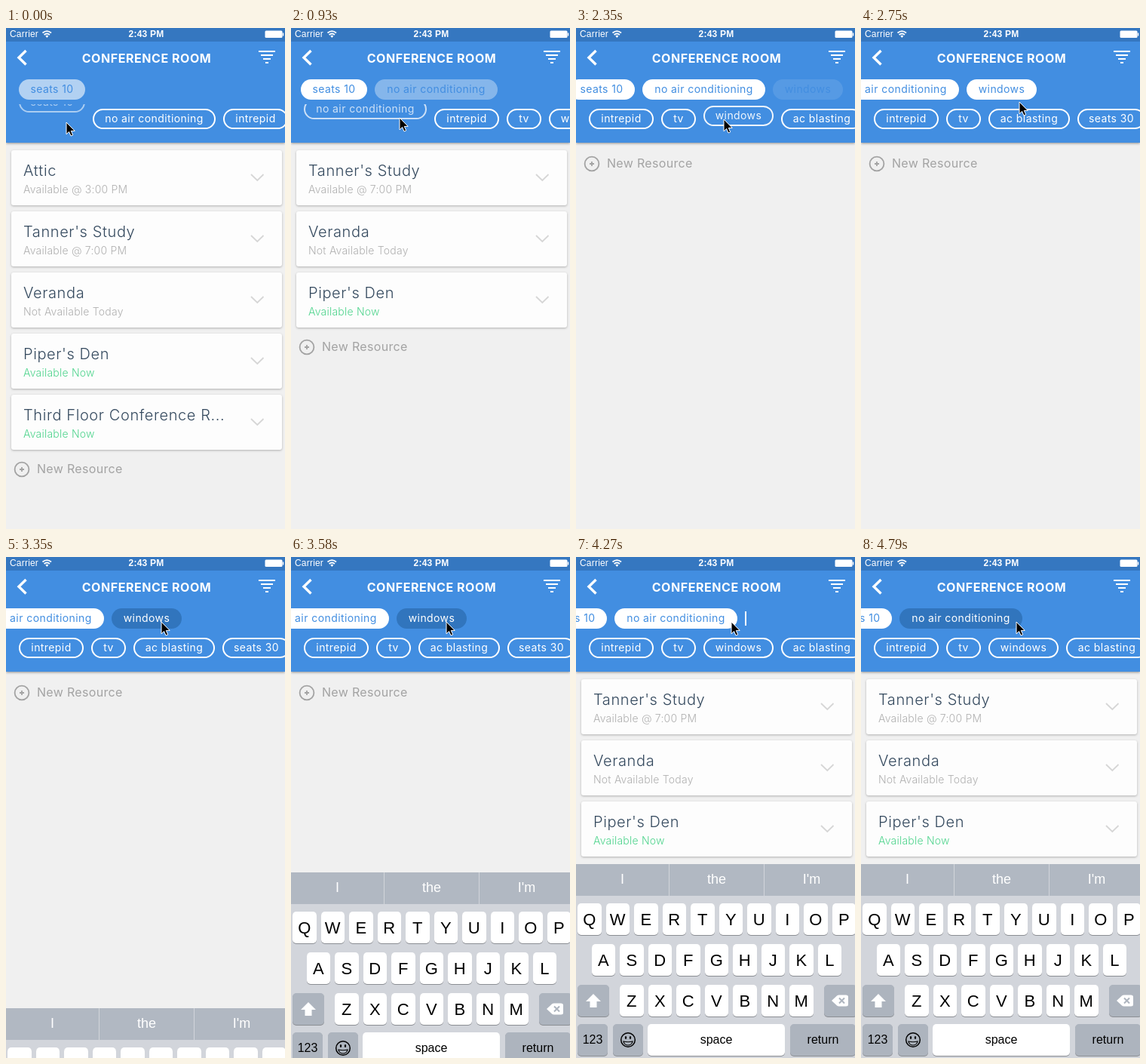
An HTML page that plays this animation: 370x664 px, repeating every 4.95 s.

```html
<!DOCTYPE html>
<html lang="en">
<head>
<meta charset="utf-8">
<title>Room filter</title>
<style>
  html, body { margin: 0; width: 100%; height: 100%; overflow: hidden; background: #f0f0f0; }
  #stage { position: relative; width: 370px; height: 664px; overflow: hidden; background: #f0f0f0;
    font: 300 14px/1 Inter, "Open Sans", sans-serif; letter-spacing: .025em; }
  #stage * { box-sizing: border-box; }
  #stage div, #stage svg { position: absolute; white-space: nowrap; }
  #stage svg { overflow: visible; fill: none; }

  #header { width: 370px; height: 152px; background: #428ee1; color: #fff; box-shadow: 0 1px 3px rgba(0,0,0,.4); }
  #status { width: 370px; height: 18px; background: #3577c0;
    font: 12px/17px "Liberation Sans", Arial, sans-serif; letter-spacing: .2px; }
  #title { left: 0; width: 373px; top: 32px; text-align: center; font-weight: 700; font-size: 16px; letter-spacing: .55px; }
  .row { left: 0; width: 370px; overflow: hidden; }
  #chosen { top: 68px; height: 27px; }
  #tags { top: 101px; height: 51px; }
  .chip { left: 0; top: 0; height: 27px; border-radius: 14px; text-align: center; line-height: 25px;
    font-weight: 400; letter-spacing: .03em; }
  #chosen .chip { background: #fff; color: #428ee1; }
  #chosen .chip.dark { background: #3175bd; color: #fff; }
  #tags .chip { top: 6px; border: 2px solid #fff; line-height: 21px; }
  #caret { left: 224px; top: 4px; width: 2px; height: 19px; background: #fff; }

  #stage #list { left: 7px; top: 162px; width: 359px; }
  #stage .card { position: relative; height: 73px; margin-bottom: 8px; background: #fdfdfd; border-radius: 3px;
    box-shadow: 0 1px 3px rgba(0,0,0,.27); }
  .name { left: 16px; top: 17px; font-size: 20px; line-height: 20px; color: #34495e; letter-spacing: .03em; }
  .info { left: 16px; top: 45px; color: #b0b0b0; letter-spacing: .015em; }
  .info.free { color: #4fd48d; }
  #stage #add { position: relative; height: 36px; color: #a3a3a3; font-size: 16px; font-weight: 400; line-height: 35px; padding-left: 34px; letter-spacing: .02em; }

  #keyboard { left: 0; top: 0; width: 375px; height: 257px; background: #d2d5db; color: #000;
    font: 22px "Liberation Sans", Arial, sans-serif; letter-spacing: 0; }
  .hint { top: 0; height: 42px; background: #b1b8c2; color: #fff; font-size: 18px; line-height: 40px; text-align: center; }
  .key { height: 42px; line-height: 43px; border-radius: 5px; background: #fff; text-align: center; box-shadow: 0 1px 0 #8b8e93; }
  .key.grey { background: #adb4be; }
  .key.word { font-size: 16px; line-height: 41px; }
</style>
</head>
<body>
<div id="stage">
  <div id="list"></div>
  <div id="header">
    <div id="status">
      <div style="left:5px">Carrier</div>
      <div style="left:0;width:372px;text-align:center;font-weight:700">2:43 PM</div>
      <svg width="370" height="18" stroke="#fff" stroke-width="1.8">
        <path d="M48.5 6.5Q54.3 1.7 60 6.5M50.6 9Q54.3 6 58 9"/>
        <path d="M52.3 10.6Q54.3 9 56.3 10.6L54.3 13Z" fill="#fff" stroke="none"/>
        <rect x="343.5" y="3.5" width="23" height="9.5" rx="1.5" fill="#fff" stroke="none"/>
        <path d="M367.5 6.5V10.5" stroke-width="1.5"/>
      </svg>
    </div>
    <svg width="370" height="60" stroke="#fff">
      <path d="M26.5 30L17 39.3L26.5 48.5" stroke-width="3.4"/>
      <path d="M335 31H357M338 36H354M341 41H351M344 46H348" stroke-width="2"/>
    </svg>
    <div id="title">CONFERENCE ROOM</div>
    <div id="chosen" class="row"><div id="caret"></div></div>
    <div id="tags" class="row"></div>
  </div>
  <div id="keyboard"></div>
  <svg id="cursor" width="12" height="19">
    <path d="M0 0V15.8L3.6 12.4L6 18L8.7 16.9L6.3 11.4H11.2Z" fill="#000" stroke="#fff" stroke-width="1"/>
  </svg>
</div>
<script>
const LOOP = 4950;
const $ = id => document.getElementById(id);

function add(parent, className, text = '', style = {}) {
  const el = document.createElement('div');
  el.className = className;
  el.textContent = text;
  Object.assign(el.style, style);
  parent.append(el);
  return el;
}

// Rooms
const rooms = [
  ['Attic', 'Available @ 3:00 PM'],
  ["Tanner's Study", 'Available @ 7:00 PM'],
  ['Veranda', 'Not Available Today'],
  ["Piper's Den", 'Available Now'],
  ['Third Floor Conference R...', 'Available Now']
].map(([name, info]) => {
  const card = add($('list'), 'card');
  add(card, 'name', name);
  add(card, info.endsWith('Now') ? 'info free' : 'info', info);
  card.insertAdjacentHTML('beforeend',
    '<svg width="359" height="73"><path d="M318 32L326.3 40L334.5 32" stroke="#d6d6d6" stroke-width="1.8"/></svg>');
  return card;
});
const addRow = add($('list'), '', 'New Resource');
addRow.id = 'add';
addRow.insertAdjacentHTML('beforeend',
  '<svg style="left:0;top:0" width="30" height="36" stroke="#a3a3a3" stroke-width="1.8"><circle cx="14" cy="18" r="9.4"/><path d="M11 18H17M14 15V21"/></svg>');

// Filter chips
const makeChip = (row, text, width) => add($(row), 'chip', text, { width: width + 'px' });
const tags = [
  ['seats 10', 88], ['no air conditioning', 163], ['intrepid', 86], ['tv', 46],
  ['windows', 93], ['ac blasting', 108], ['seats 30', 90]
].map(([text, width]) => ({ text, width, el: makeChip('tags', text, width) }));
const [seats, noAir, , , windows] = tags;
const chosen = [seats, noAir, windows].map(tag => makeChip('chosen', tag.text, tag.width));

// Keyboard
const board = $('keyboard');
const px = n => n + 'px';
const key = (text, left, top, width, kind = '') =>
  add(board, 'key ' + kind, text, { left: px(left), top: px(top), width: px(width) });
['I', 'the', "I'm"].forEach((text, i) =>
  add(board, 'hint', text, { left: px([0, 124, 250][i]), width: px([123, 125, 125][i]) }));
[['QWERTYUIOP', 2, 52], ['ASDFGHJKL', 20.5, 106], ['ZXCVBNM', 58, 160]].forEach(([letters, left, top]) =>
  [...letters].forEach((letter, i) => key(letter, left + 37.5 * i, top, 31.5)));
const icon = (el, shapes) => el.insertAdjacentHTML('beforeend',
  `<svg style="left:0;top:0" width="42" height="42">${shapes}</svg>`);
icon(key('', 2, 160, 42, 'grey'),
  '<path d="M21 12L31 22H25.5V30H16.5V22H11Z" fill="#fff"/>');
icon(key('', 329, 160, 44, 'grey'),
  '<path d="M10 21L17 14.5Q18 13.5 20 13.5H29Q32 13.5 32 16V26Q32 28.5 29 28.5H20Q18 28.5 17 27.5Z" fill="#fff"/>' +
  '<path d="M20 17.5L27 24.5M27 17.5L20 24.5" stroke="#adb4be" stroke-width="2"/>');
key('123', 2, 212, 40, 'grey word');
icon(key('', 49, 212, 40, 'grey'),
  '<circle cx="20" cy="21" r="9.3" stroke="#000" stroke-width="1.5"/>' +
  '<path d="M14 23Q20 24.5 26 23Q25 28 20 28T14 23Z" stroke="#000" stroke-width="1.2"/>' +
  '<ellipse cx="17" cy="18" rx="1.2" ry="2" fill="#000"/><ellipse cx="23" cy="18" rx="1.2" ry="2" fill="#000"/>');
key('space', 95, 212, 182, 'word');
key('return', 284, 212, 87, 'grey word');

// Motion
const ramp = (t, from, to) => Math.min(1, Math.max(0, (t - from) / (to - from)));
const smooth = k => k * k * (3 - 2 * k);
const lift = (t, start) => ramp(t, start, start + 370) ** 2;
const move = (el, x, y) => { el.style.transform = `translate(${Math.round(x)}px, ${Math.round(y)}px)`; };

const cursorPath = [
  [0, 80, 125], [60, 84, 125], [350, 144, 119], [930, 144, 119], [1220, 170, 123],
  [1340, 193, 123], [1750, 193, 123], [1810, 196, 121], [2350, 196, 121],
  [2750, 210, 98], [2870, 206, 86], [LOOP, 206, 86]
];

function cursorAt(t) {
  const i = Math.max(1, cursorPath.findIndex(p => p[0] > t));
  const [t0, x0, y0] = cursorPath[i - 1], [t1, x1, y1] = cursorPath[i];
  const k = ramp(t, t0, t1);
  return [x0 + (x1 - x0) * k, y0 + (y1 - y0) * k];
}

function draw(t) {
  const back = smooth(ramp(t, 4010, 4270));
  const picks = [
    { tag: seats, up: lift(t, -284), gone: smooth(ramp(t, 86, 320)) },
    { tag: noAir, up: lift(t, 710), gone: smooth(ramp(t, 1080, 1220)) },
    { tag: windows, up: lift(t, 2230), gone: smooth(ramp(t, 2600, 2750)) }
  ];

  // Tags rise out of the lower row, then the others close the gap.
  let x = 17;
  for (const tag of tags) {
    const pick = picks.find(p => p.tag === tag);
    let up = pick ? pick.up : 0, room = pick ? 1 - pick.gone : 1;
    let alpha = up < 1 ? 1 - 0.75 * up : 0;
    if (tag === windows && back > 0) { up = 0; room = alpha = back; }
    move(tag.el, x, -37 * up);
    tag.el.style.opacity = alpha;
    x += (tag.width + 10) * room;
  }

  let left = 17 - 12 * picks[1].up - 136 * picks[2].up + 84 * back;
  picks.forEach(({ tag, up }, i) => {
    move(chosen[i], left, 0);
    chosen[i].style.opacity = tag === windows ? up * (1 - back) : up;
    left += tag.width + 10;
  });
  chosen[1].classList.toggle('dark', t >= 4510);
  chosen[2].classList.toggle('dark', t >= 3350);
  $('caret').style.opacity = t < 4210 ? 0 : 1 - ramp(t, 4510, 4770);

  const empty = t >= 2230 && t < 4040;
  rooms.forEach((card, i) => {
    const fits = i > 0 && i < 4;
    card.style.display = t < 710 || (fits && !empty) ? '' : 'none';
  });

  // Critically damped rise
  const s = Math.max(0, t - 3294) * 0.0172;
  const hidden = t < 3350 ? 1 : (1 + s) * Math.exp(-s);
  move(board, 0, 407 + 257 * hidden);

  move($('cursor'), ...cursorAt(t));
}

function tick() {
  draw(performance.now() % LOOP);
  requestAnimationFrame(tick);
}
tick();
</script>
</body>
</html>
```
